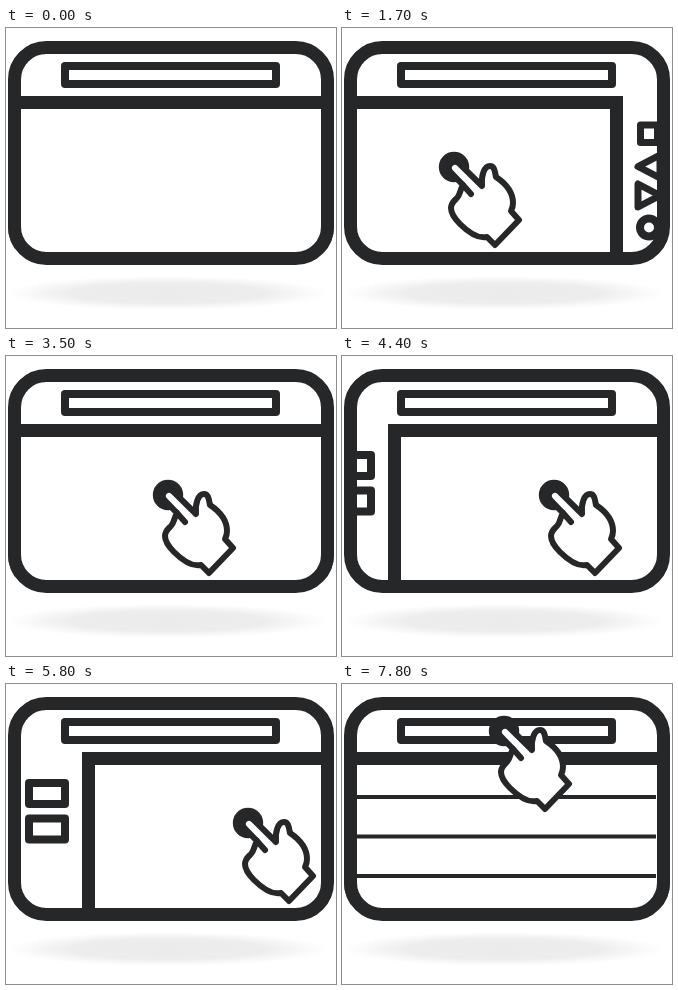
Animation of 330 by 300 pixels, one loop 8 s. Source, as an HTML page with a canvas:

```html
<!DOCTYPE html>
<html lang="en">
<head>
<meta charset="utf-8">
<title>Swipe gestures</title>
<style>
html, body { margin: 0; width: 100%; height: 100%; overflow: hidden; background: #fff; }
canvas { display: block; width: 330px; height: 300px; }
</style>
</head>
<body>
<canvas id="stage" width="330" height="300"></canvas>
<script>
const ctx = document.getElementById('stage').getContext('2d');
const LOOP = 8000, TICK = 100;
const INK = '#262729';

// Hand outline, relative to the touch point.
const hand = new Path2D(
  'M9 18 L-3.3 5.3 A6 6 0 0 1 5.3 -3.3 L28 19 ' +
  'C27 9 30 -1 36 -1 C41 -1 41 6 42 10 C51 16 59 25 59 36 Q59 40 57 44 ' +
  'L65 53 L41 78 L33 70 C24 72 14 65 6 57 C1 52 -3 47 -3 41 ' +
  'C-3 36 0 34 3 31 C6 28 6 23 9 18 Z');
const fingerCrease = new Path2D('M9 18 L17 27');

// Number of ticks completed in a stepped move that starts at `start`.
function steps(t, start, count) {
  return Math.max(0, Math.min(count, Math.floor((t - start) / TICK) + 1));
}

function pose(t) {
  const left = steps(t, 1300, 7) - steps(t, 2900, 7);
  const right = steps(t, 4000, 9) - steps(t, 5800, 9);
  const drop = 4 - steps(t, 500, 4);
  const lift = steps(t, 7200, 2);
  return {
    dx: 10 * (right - left),
    dy: -46 * (drop + lift),
    hand: t >= 500,
    touch: (t >= 800 && t < 7100) || t >= 7800,
    list: t >= 7800
  };
}

function strokeShape(width, build) {
  ctx.lineWidth = width;
  ctx.beginPath();
  build();
  ctx.stroke();
}

function triangle(tipX, baseX, y) {
  strokeShape(7, () => {
    ctx.moveTo(tipX, y);
    ctx.lineTo(baseX, y - 11.5);
    ctx.lineTo(baseX, y + 11.5);
    ctx.closePath();
  });
}

function drawShadow() {
  ctx.save();
  ctx.translate(161, 265);
  ctx.scale(160, 17);
  const g = ctx.createRadialGradient(0, 0, 0, 0, 0, 1);
  g.addColorStop(0, '#ebebeb');
  g.addColorStop(0.6, '#ededed');
  g.addColorStop(1, '#ffffff');
  ctx.fillStyle = g;
  ctx.fillRect(-1, -1, 2, 2);
  ctx.restore();
}

function drawPage(dx) {
  ctx.save();
  ctx.beginPath();
  ctx.roundRect(2, 13, 326, 224, 38);
  ctx.clip();
  ctx.translate(dx, 0);

  ctx.fillRect(-4, 68, 335, 13);
  ctx.fillRect(-4, 68, 13, 160);
  ctx.fillRect(318, 68, 13, 160);

  for (const y of [99, 134.5]) strokeShape(8, () => ctx.rect(-57, y, 36, 21));

  strokeShape(7, () => ctx.rect(348.5, 97, 17, 17.5));
  triangle(346, 368, 138.5);
  triangle(368, 346, 167.5);
  strokeShape(8, () => ctx.arc(357, 199.5, 9, 0, 2 * Math.PI));
  ctx.restore();
}

function drawBrowser() {
  strokeShape(13, () => ctx.roundRect(8.5, 19.5, 313, 211, 32));
  strokeShape(8, () => ctx.rect(59, 38, 211, 18));
}

function drawHand(p) {
  ctx.save();
  ctx.translate(162 + p.dx, 139 + p.dy);
  if (p.touch) {
    ctx.beginPath();
    ctx.arc(0, 0, 15.2, 0, 2 * Math.PI);
    ctx.fill();
  }
  ctx.fillStyle = '#fff';
  ctx.fill(hand);
  ctx.lineWidth = 6;
  ctx.stroke(hand);
  ctx.stroke(fingerCrease);
  ctx.restore();
}

function draw(t) {
  const p = pose(t);
  ctx.fillStyle = '#fff';
  ctx.fillRect(0, 0, 330, 300);
  drawShadow();
  ctx.fillStyle = ctx.strokeStyle = INK;
  ctx.lineJoin = ctx.lineCap = 'round';
  drawPage(p.dx);
  if (p.list) {
    for (let i = 0; i < 3; i++) ctx.fillRect(15, 111 + 39.5 * i, 299, 4);
  }
  drawBrowser();
  if (p.hand) drawHand(p);
}

const start = performance.now();
function frame() {
  draw((performance.now() - start) % LOOP);
  requestAnimationFrame(frame);
}
frame();
</script>
</body>
</html>
```
